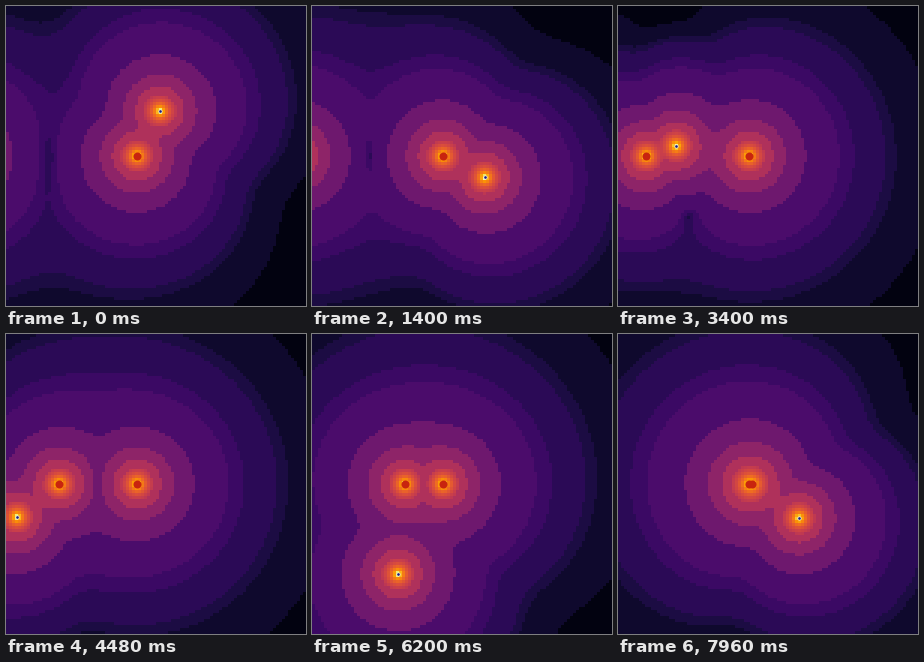
A matplotlib script for the animation above (8 s loop, 300x300 px).

```python
import numpy as np
import matplotlib.pyplot as plt
from matplotlib.animation import FuncAnimation

SIZE, CELL = 300, 3
STEP, FRAMES = 40, 200
POWER = 5            # field strength falls as r ** -POWER
FIXED = np.array([131, 150])
SWITCH = 2480        # ms, the electron leaves the fixed proton

# Outer radius of each flat band and the colour level inside it
EDGES = [16.3, 24.6, 37, 57, 91, 106, 138, 149, 195]
LEVELS = np.array([0, 0.47, 0.39, 0.31, 0.225, 0.185, 0.15, 0.115, 0.08, 0.03])

# Orbit around the moving proton: time, radius, angle in degrees
TIMES = np.array([SWITCH, 3400, 4480, 6200, 7960])
RADII = np.array([106.6, 31.4, 53.6, 90.3, 58.3])
ANGLES = np.array([20.3, -18.5, -218, -265.6, -324.3])

centres = np.arange(CELL / 2, SIZE, CELL)
X, Y = np.meshgrid(centres, centres)


def polar(r, degrees):
    a = np.radians(degrees)
    return r * np.array([np.cos(a), np.sin(a)])


def glide(t, values, start=None):
    """Hermite curve whose slopes never overshoot the keys."""
    secant = np.diff(values) / np.diff(TIMES)
    a, b = secant[:-1], secant[1:]
    inner = np.where(a * b > 0, 2 * a * b / (a + b), 0)
    first = secant[0] if start is None else start
    slope = np.concatenate([[first], inner, [secant[-1]]])
    i = np.clip(np.searchsorted(TIMES, t, side="right") - 1, 0, len(secant) - 1)
    span = TIMES[i + 1] - TIMES[i]
    u = (t - TIMES[i]) / span
    ease = u * u * (3 - 2 * u)
    return (values[i] + (values[i + 1] - values[i]) * ease
            + span * u * (1 - u) * (slope[i] * (1 - u) - slope[i + 1] * u))


def proton_at(t):
    return np.array([-50.3 + 0.0231 * t, 150])


def electron_at(t):
    if t < SWITCH:
        u = t / SWITCH
        return FIXED + polar(50.5 - 6.5 * u, -63 + 125 * u + 61 * u * u)
    return proton_at(t) + polar(glide(t, RADII), glide(t, ANGLES, start=0))


def shade(charges):
    """Field strength as the radius where one charge alone would match it."""
    ex, ey = np.zeros_like(X), np.zeros_like(X)
    for q, (cx, cy) in charges:
        dx, dy = X - cx, Y - cy
        r = np.maximum(np.hypot(dx, dy), 0.5)
        ex += q * dx / r ** (POWER + 1)
        ey += q * dy / r ** (POWER + 1)
    radius = np.maximum(np.hypot(ex, ey), 1e-30) ** (-1 / POWER)
    core = 1.04 - 0.191 * np.log(radius)
    return np.where(radius < EDGES[0], core, LEVELS[np.digitize(radius, EDGES)])


fig = plt.figure(figsize=(SIZE / 100, SIZE / 100), dpi=100)
ax = fig.add_axes([0, 0, 1, 1])
ax.axis("off")
field = ax.imshow(np.zeros_like(X), cmap="inferno", vmin=0, vmax=1,
                  extent=(0, SIZE, SIZE, 0), interpolation="nearest",
                  aspect="auto")


def dot(diameter, color):
    return ax.plot([], [], "o", ms=diameter * 0.72, mew=0, color=color)[0]


protons = dot(8, "#c8240f")
halo = dot(4.2, "#ece8d0")
electron = dot(2.6, "#1c1c80")
ax.set_xlim(0, SIZE)
ax.set_ylim(SIZE, 0)


def update(n):
    t = n * STEP if n > 1 else 0     # the first picture holds for two steps
    moving, e = proton_at(t), electron_at(t)
    field.set_data(shade([(1, FIXED), (1, moving), (-1, e)]))
    protons.set_data(*np.transpose([FIXED, moving]))
    for part in (halo, electron):
        part.set_data([e[0]], [e[1]])
    return field, protons, halo, electron


anim = FuncAnimation(fig, update, frames=FRAMES, interval=STEP,
                     repeat=True, repeat_delay=0, blit=False)
plt.show()
```
